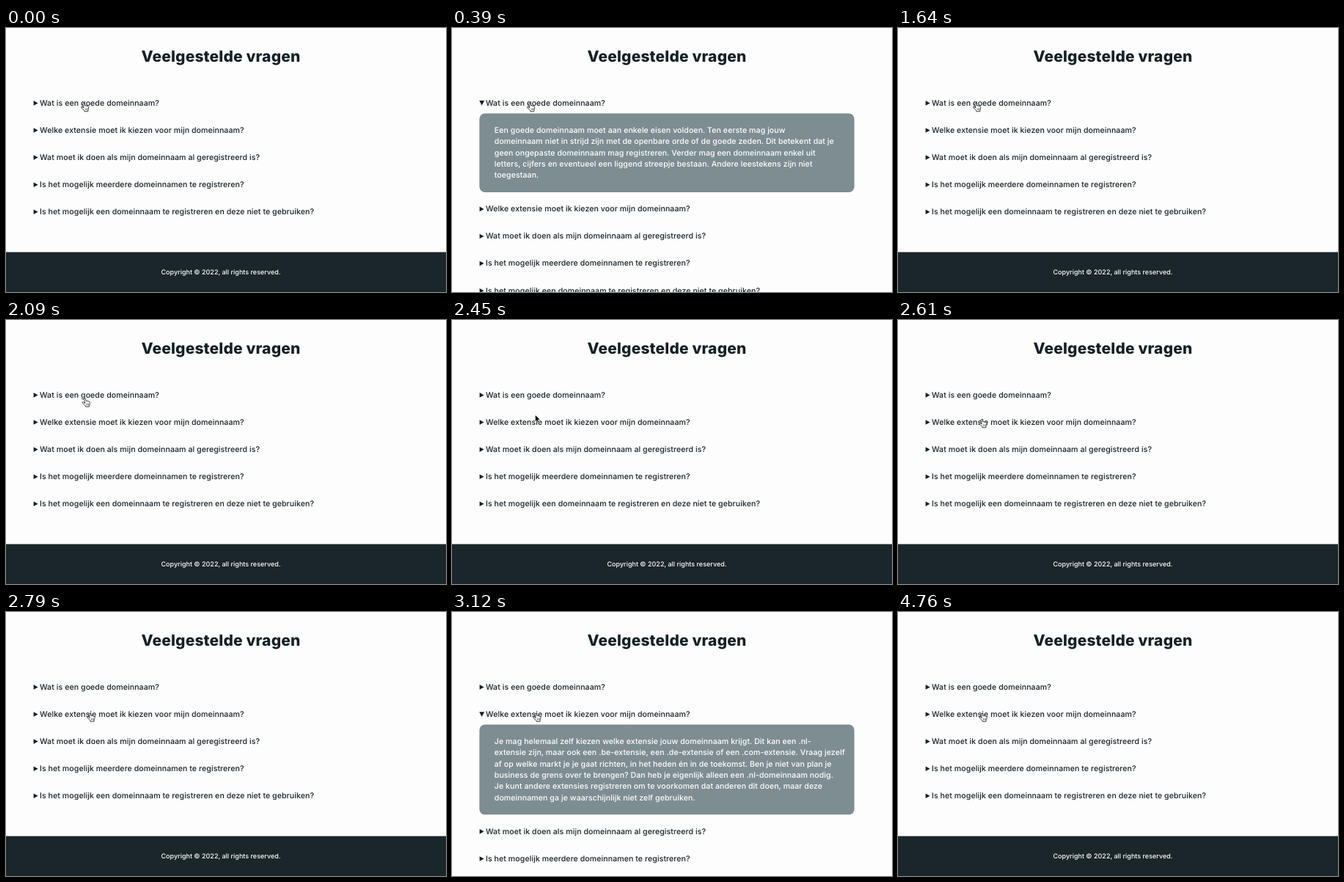
Animation of 600x360 px, one loop 7.03 s. Source, as an HTML page:

```html
<!DOCTYPE html>
<html lang="nl">
<head>
<meta charset="utf-8">
<title>Veelgestelde vragen</title>
<style>
  html, body { margin: 0; width: 100%; height: 100%; overflow: hidden; background: #fefdfe; }
  svg { display: block; width: 100%; height: 100%; }
  text { font: 500 10.6px Inter, "Open Sans", sans-serif; letter-spacing: .06px; fill: #152024; text-rendering: geometricPrecision; }
  .title { font-size: 21px; font-weight: 800; letter-spacing: .15px; text-anchor: middle; }
  .legal { font-size: 9px; letter-spacing: 0; text-anchor: middle; fill: #fff; }
  .answer text { fill: #fff; }
  .answer rect { fill: #7e8d92; }
  .marker { fill: #152024; }
</style>
</head>
<body>
<svg viewBox="0 0 600 360">
  <text class="title" x="293" y="45.8">Veelgestelde vragen</text>
  <g id="list"></g>
  <g id="footer">
    <rect y="305.6" width="600" height="200" fill="#1b262a"/>
    <text class="legal" x="293" y="335.5">Copyright © 2022, all rights reserved.</text>
  </g>
  <g id="cursor" stroke-linejoin="round" stroke-linecap="round">
    <path id="arrow" d="M0 0V9.3L2.1 7.3 3.5 10.4 5.1 9.7 3.8 6.7H6.6Z" fill="#000" stroke="#fff" stroke-width=".6"/>
    <g id="hand" fill="#fff" stroke="#111" stroke-width=".8">
      <path d="M-1.1 .7C-1.2-.5 .5-.7 .9 .5L1.7 3.5C2.2 2.6 3.2 2.7 3.5 3.8C4 3 5 3.2 5.2 4.3C5.9 3.7 6.6 4.2 6.7 5.1C6.8 7.2 6.5 8.2 5.8 9.2V11.1H.9V10C-.6 8.8-1.8 7.6-3.2 6.1C-4 5-2.7 4.2-1.8 5L-.3 6.2Z"/>
      <path d="M2.2 7V9M3.7 7V9M5.1 7V9" fill="none" stroke-width=".5"/>
    </g>
  </g>
</svg>
<script>
const LOOP = 7030, ROW = 37.1, LINE = 15.36;
const faq = [
  ["Wat is een goede domeinnaam?",
    "Een goede domeinnaam moet aan enkele eisen voldoen. Ten eerste mag jouw",
    "domeinnaam niet in strijd zijn met de openbare orde of de goede zeden. Dit betekent dat je",
    "geen ongepaste domeinnaam mag registreren. Verder mag een domeinnaam enkel uit",
    "letters, cijfers en eventueel een liggend streepje bestaan. Andere leestekens zijn niet",
    "toegestaan."],
  ["Welke extensie moet ik kiezen voor mijn domeinnaam?",
    "Je mag helemaal zelf kiezen welke extensie jouw domeinnaam krijgt. Dit kan een .nl-",
    "extensie zijn, maar ook een .be-extensie, een .de-extensie of een .com-extensie. Vraag jezelf",
    "af op welke markt je je gaat richten, in het heden én in de toekomst. Ben je niet van plan je",
    "business de grens over te brengen? Dan heb je eigenlijk alleen een .nl-domeinnaam nodig.",
    "Je kunt andere extensies registreren om te voorkomen dat anderen dit doen, maar deze",
    "domeinnamen ga je waarschijnlijk niet zelf gebruiken."],
  ["Wat moet ik doen als mijn domeinnaam al geregistreerd is?"],
  ["Is het mogelijk meerdere domeinnamen te registreren?"],
  ["Is het mogelijk een domeinnaam te registreren en deze niet te gebruiken?"]
];
const $ = id => document.getElementById(id);
const show = (node, on) => node.setAttribute("display", on ? "inline" : "none");
const move = (node, x, y) => node.setAttribute("transform", `translate(${x} ${y})`);
const cardHeight = lines => 30.6 + LINE * lines;

// Row coordinates are relative to the vertical middle of each question.
$("list").innerHTML = faq.map(([question, ...lines]) => `<g>
  <path class="marker"/>
  <text x="46" y="3.4">${question}</text>
  <g class="answer">
    <rect x="37.4" y="14.2" width="511.2" height="${cardHeight(lines.length)}" rx="7.5"/>
    ${lines.map((line, i) => `<text x="57.8" y="${40.6 + LINE * i}">${line}</text>`).join("")}
  </g></g>`).join("");
const rows = [...$("list").children];

function layout(open) {
  const extra = open < 0 ? 0 : cardHeight(faq[open].length - 1);
  rows.forEach((row, i) => {
    move(row, 0, 102.3 + ROW * i + (i > open ? extra : 0));
    row.querySelector(".marker").setAttribute("d",
      i === open ? "M37.2-3.2H44.2L40.7 3.3Z" : "M37.6-3.2L43.6 .1 37.6 3.4Z");
    show(row.querySelector(".answer"), i === open);
  });
  move($("footer"), 0, extra);
}

function placeCursor(t) {
  const p = t < 2030 ? 0 : Math.min(1, (t - 2000) / 790) ** .7;
  const down = p * p * (3 - 2 * p);
  const across = 1 - (1 - down) ** 1.7;
  const y = 102.7 + 35.5 * down;
  const overQuestion = y < 110 || y > 131.7;
  move($("cursor"), 106 + 8.3 * across, y);
  show($("hand"), overQuestion);
  show($("arrow"), !overQuestion);
}

let shown;
function frame() {
  const t = performance.now() % LOOP;
  const open = t >= 390 && t < 1640 ? 0 : t >= 3120 && t < 4760 ? 1 : -1;
  if (open !== shown) layout(shown = open);
  placeCursor(t);
  requestAnimationFrame(frame);
}
frame();
</script>
</body>
</html>
```
